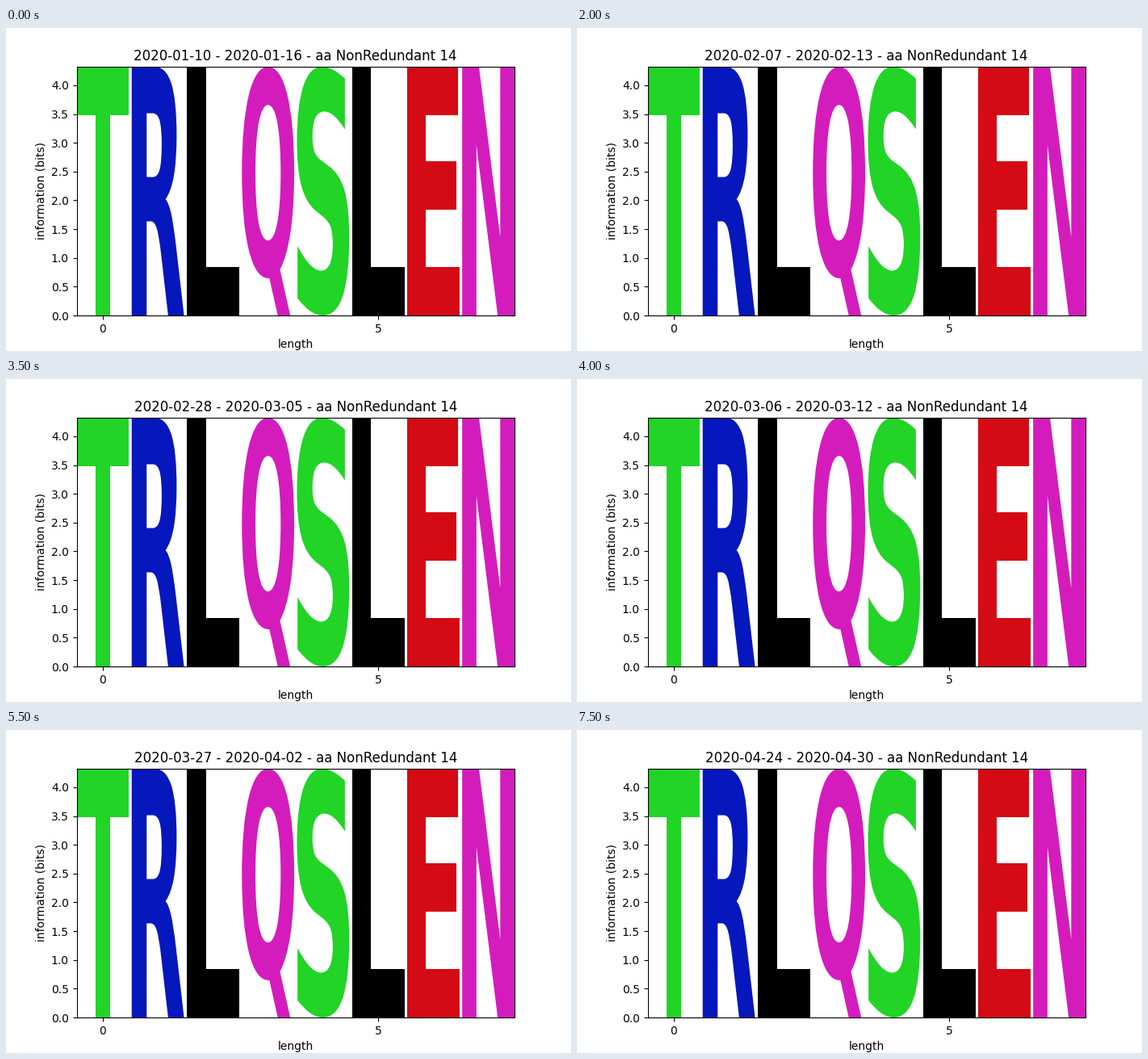
A matplotlib script that plays this animation: 700 by 400 pixels, repeating every 8 s.

```python
import numpy as np
import matplotlib.pyplot as plt
from matplotlib.animation import FuncAnimation
from matplotlib.patches import PathPatch
from matplotlib.textpath import TextPath
from matplotlib.transforms import Affine2D

plt.rcParams["font.family"] = "DejaVu Sans"

SEQUENCE = "TRLQSLEN"
HEIGHT = np.log2(20)
WIDTH = 0.95
WEEKS = 16
START = np.datetime64("2020-01-10")

BLUE = (0.02, 0.09, 0.74)
PINK = (0.83, 0.11, 0.74)
GREEN = (0.13, 0.83, 0.15)
RED = (0.83, 0.04, 0.08)
COLORS = {"T": GREEN, "S": GREEN, "R": BLUE, "Q": PINK, "N": PINK,
          "E": RED, "L": "black"}


def add_letter(ax, char, slot):
    """Stretch a bold letter to fill its slot in the logo."""
    path = TextPath((0, 0), char, size=1,
                    prop={"family": "DejaVu Sans", "weight": "bold"})
    box = path.get_extents()
    fit = (Affine2D()
           .translate(-box.x0, -box.y0)
           .scale(WIDTH / box.width, HEIGHT / box.height)
           .translate(slot - WIDTH / 2, 0))
    ax.add_patch(PathPatch(fit.transform_path(path), facecolor=COLORS[char],
                           edgecolor="none", linewidth=0, zorder=0))


def week_title(week):
    first = START + 7 * week
    return f"{first} - {first + 6} - aa NonRedundant 14"


fig, ax = plt.subplots(figsize=(7, 4), dpi=100)
for slot, char in enumerate(SEQUENCE):
    add_letter(ax, char, slot)

ax.set_xlim(-WIDTH / 2, len(SEQUENCE) - 1 + WIDTH / 2)
ax.set_ylim(0, HEIGHT)
ax.set_xticks([0, 5])
ax.set_yticks(np.arange(0, 4.1, 0.5))
ax.set_xlabel("length")
ax.set_ylabel("information (bits)")
title = ax.set_title(week_title(0))


def update(week):
    title.set_text(week_title(week))
    return [title]


anim = FuncAnimation(fig, update, frames=WEEKS, interval=500,
                     repeat=True, repeat_delay=0)
plt.show()
```
